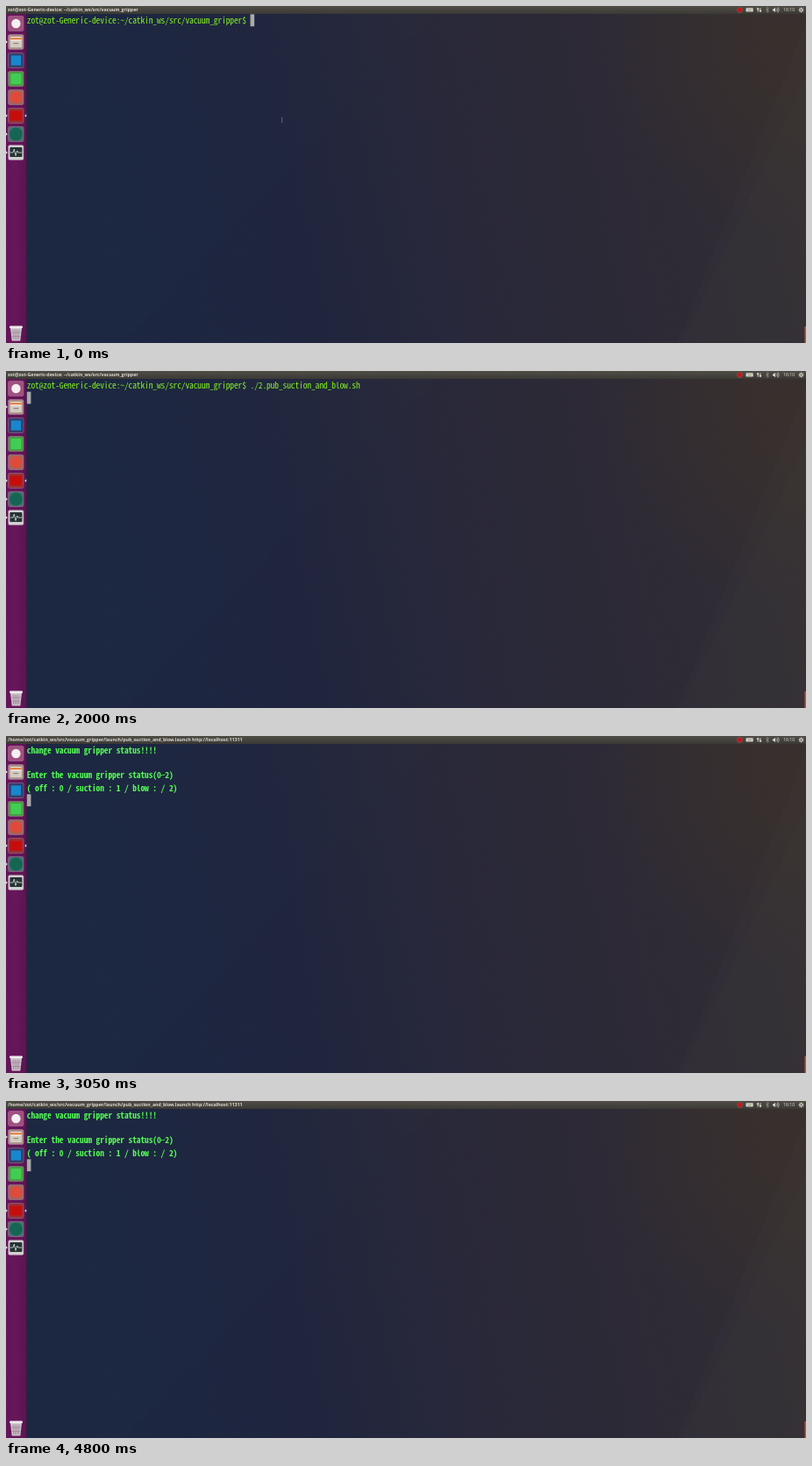
Animation of 912 by 384 pixels, one loop 4.85 s. Source, as an HTML page with a canvas:

```html
<!DOCTYPE html>
<html lang="en">
<head>
<meta charset="utf-8">
<title>Vacuum gripper terminal</title>
<style>
html, body { margin: 0; width: 100%; height: 100%; overflow: hidden; background: #1d2741; }
canvas { display: block; width: 912px; height: 384px; }
</style>
</head>
<body>
<canvas id="stage" width="912" height="384"></canvas>
<script>
const W = 912, H = 384, LOOP = 4850, FRAME = 50;
const COL = 4.631, ROW = 14.23, LEFT = 23.8, BASE = 19.9;
const MONO = '"Noto Sans Mono CJK KR", "Noto Sans Mono CJK JP", "Noto Sans Mono CJK SC", "Noto Sans Mono", monospace';
const GREEN = '#86f622', BRIGHT = '#55ff55', YELLOW = '#ffff00';
const ctx = document.getElementById('stage').getContext('2d');

const prompt = 'zot@zot-Generic-device:~/catkin_ws/src/vacuum_gripper$ ';
const command = './2.pub_suction_and_blow.sh';
const shellTitle = 'zot@zot-Generic-device: ~/catkin_ws/src/vacuum_gripper';
const launchTitle = '/home/zot/catkin_ws/src/vacuum_gripper/launch/pub_suction_and_blow.launch';

// [time, number of command characters on the line]
const typing = [[750, 1], [900, 2], [1150, 3], [1550, command.length]];
const ENTER = 1850, CLEAR = 2900;

// [time, row, text, bold]
const output = [
  [2200, 1, '... logging to /home/zot/.ros/log/d6d5ea46-9eae-11ec-a517-001de0863fef/roslaunch-zot-Generic-device-3853.log'],
  [2200, 2, 'Checking log directory for disk usage. This may take awhile.'],
  [2200, 3, 'Press Ctrl-C to interrupt'],
  [2250, 4, 'Done checking log file disk usage. Usage is <1GB.'],
  [2350, 6, 'started roslaunch server http://localhost:35783/', true],
  [2350, 8, 'SUMMARY'],
  [2350, 9, '========'],
  [2350, 11, 'PARAMETERS'],
  [2350, 12, ' * /rosdistro: kinetic'],
  [2350, 13, ' * /rosversion: 1.12.17'],
  [2350, 15, 'NODES'],
  [2350, 16, '  /'],
  [2350, 17, '    pub_suction_and_blow (vacuum_gripper/pub_suction_and_blow)'],
  [2400, 19, 'auto-starting new master'],
  [2400, 20, 'process[master]: started with pid [3865]', true]
];

function rect(g, x, y, w, h, color) {
  g.fillStyle = color;
  g.fillRect(x, y, w, h);
}

function box(g, x, y, w, h, r, color) {
  g.fillStyle = color;
  g.beginPath();
  g.roundRect(x, y, w, h, r);
  g.fill();
}

function disc(g, x, y, r, color) {
  g.fillStyle = color;
  g.beginPath();
  g.arc(x, y, r, 0, Math.PI * 2);
  g.fill();
}

function poly(g, points, color) {
  g.fillStyle = color;
  g.beginPath();
  points.forEach(([x, y]) => g.lineTo(x, y));
  g.fill();
}

function line(g, points, color, width) {
  g.strokeStyle = color;
  g.lineWidth = width;
  g.beginPath();
  points.forEach(([x, y]) => g.lineTo(x, y));
  g.stroke();
}

function gradient(g, x0, y0, x1, y1, ...colors) {
  const fill = g.createLinearGradient(x0, y0, x1, y1);
  colors.forEach((c, i) => fill.addColorStop(i / (colors.length - 1), c));
  return fill;
}

function wallpaper(g) {
  rect(g, 0, 0, W, H, gradient(g, 40, 280, 890, 90,
    '#1c2842', '#1d2741', '#20263f', '#27293b', '#2c2a37', '#302d35', '#343033'));
  const glow = g.createRadialGradient(890, 40, 10, 890, 40, 220);
  glow.addColorStop(0, 'rgba(62,52,40,.55)');
  glow.addColorStop(1, 'rgba(62,52,40,0)');
  rect(g, 0, 0, W, H, glow);
  poly(g, [[490, 9], [135, H], [770, H], [912, 80], [912, 9]], 'rgba(36,26,52,.06)');
  poly(g, [[912, 20], [765, H], [W, H]], 'rgba(235,245,235,.01)');
  rect(g, 910.5, 365, 1.5, 19, '#d8492c');
}

function tile(g, y, color) {
  box(g, 2.3, y - 8.8, 18, 17.6, 2, 'rgba(255,255,255,.4)');
  box(g, 2.8, y - 8.3, 17, 16.6, 1.6, color);
}

function launcher(g) {
  rect(g, 0, 9, 23.3, H - 9, gradient(g, 0, 0, 23, 0, '#64145a', '#661659', '#5b1452'));
  rect(g, 22.8, 9, 0.6, H - 9, '#45143f');

  tile(g, 20, '#a0517e');
  disc(g, 11.4, 20, 5.2, '#f5eff3');

  tile(g, 41, '#a98f86');
  box(g, 4.8, 35, 13, 12, 1, '#e8e2da');
  rect(g, 4.8, 36.2, 13, 2, '#e67a3c');
  box(g, 4.8, 40, 13, 7.2, 1, '#d3cbc2');
  rect(g, 8.5, 42, 5.6, 1.2, '#8d857d');

  tile(g, 62, '#34406b');
  rect(g, 5.8, 56.4, 11.2, 11.2, '#1787cf');

  tile(g, 83, '#4c9b47');
  rect(g, 5.4, 77, 12, 12, '#41cd52');

  tile(g, 104, '#9a6a62');
  disc(g, 11.4, 104, 7, '#e04a3a');

  tile(g, 125, '#963335');
  rect(g, 4.7, 119.5, 13.4, 11, '#c80c0c');

  tile(g, 146, '#4e6d70');
  disc(g, 11.4, 146, 7.4, '#146653');

  tile(g, 167, '#d0d2d1');
  box(g, 4.4, 161, 14, 11, 1, '#273334');
  line(g, [[5, 167], [8, 167], [9.3, 163], [11, 170.5], [12.7, 165], [14, 167], [18, 167]], '#d7e7e2', 0.8);

  poly(g, [[5, 367], [18, 367], [16.3, 381.5], [6.7, 381.5]], '#cfc7cd');
  box(g, 4, 364.5, 15, 2.8, 1.2, '#eeeaed');
  for (let x = 8; x < 16; x += 2.3) line(g, [[x, 368.5], [x + (11.5 - x) * .15, 380]], '#8b6c85', 0.7);
  line(g, [[6, 372], [17, 372]], '#9a7b94', 0.6);
  line(g, [[6.4, 376.5], [16.6, 376.5]], '#9a7b94', 0.6);

  [41, 125, 146, 167].forEach(y => poly(g, [[0, y - 1.8], [1.8, y], [0, y + 1.8]], '#e5dfe4'));
  poly(g, [[23.2, 123.2], [21.2, 125], [23.2, 126.8]], '#e5dfe4');
}

function panel(g) {
  const ink = '#dfdbd2';
  rect(g, 0, 0, W, 9, gradient(g, 0, 0, 0, 9, '#504e47', '#45433d', '#3c3a36'));
  disc(g, 836.5, 4.5, 3.1, '#8d6a66');
  disc(g, 836.5, 4.5, 2.7, '#c4161b');
  box(g, 843.5, 2.3, 8.2, 4.2, 0.7, ink);
  line(g, [[844.5, 3.7], [850.7, 3.7]], '#777269', 0.5);
  line(g, [[845.5, 5.3], [849.7, 5.3]], '#777269', 0.6);
  poly(g, [[855.6, 4], [857.2, 1.6], [858.8, 4]], ink);
  rect(g, 856.7, 3, 1, 3.5, ink);
  poly(g, [[858.4, 5], [860, 7.4], [861.6, 5]], ink);
  rect(g, 859.5, 2.4, 1, 3.5, ink);
  line(g, [[866.5, 2.9], [869.5, 5.9], [868, 7.4], [868, 1.4], [869.5, 2.9], [866.5, 5.9]], '#a7a39b', 0.6);
  poly(g, [[874, 3.5], [875.3, 3.5], [877, 1.8], [877, 7.2], [875.3, 5.5], [874, 5.5]], ink);
  g.strokeStyle = ink;
  g.lineWidth = 0.6;
  [1.8, 3.2, 4.6].forEach(r => {
    g.beginPath();
    g.arc(876.6, 4.5, r, -0.75, 0.75);
    g.stroke();
  });
  label(g, '16:10', 886, 6.3, '5.2px "Open Sans", "Noto Sans", sans-serif', ink);
  for (let i = 0; i < 8; i++) {
    const a = i * Math.PI / 4;
    line(g, [[906.5, 4.5], [906.5 + 2.9 * Math.cos(a), 4.5 + 2.9 * Math.sin(a)]], ink, 1);
  }
  disc(g, 906.5, 4.5, 2.1, ink);
  disc(g, 906.5, 4.5, 1, '#45433d');
}

// Small type is laid out large and scaled down, which keeps fractional advances.
function label(g, text, x, y, font, color) {
  const zoom = 8;
  g.save();
  g.translate(x, y);
  g.scale(1 / zoom, 1 / zoom);
  g.font = font.replace(/([\d.]+)px/, (_, size) => size * zoom + 'px');
  g.fillStyle = color;
  g.fillText(text, 0, 0);
  g.restore();
}

function print(row, text, color = GREEN, bold = false) {
  const font = `${bold ? 'bold ' : ''}9.5px ${MONO}`;
  [...text].forEach((c, i) => {
    if (c !== ' ') label(ctx, c, LEFT + i * COL, BASE + row * ROW, font, color);
  });
}

function cursor(row, col) {
  rect(ctx, LEFT + col * COL, 9.4 + row * ROW, COL, 13.8, '#aaa9ab');
}

function pointer() {
  line(ctx, [[314.5, 127.5], [314.5, 132.3]], '#858b94', 0.6);
  line(ctx, [[313.7, 127.4], [315.3, 127.4]], '#767c88', 0.5);
  line(ctx, [[313.7, 132.4], [315.3, 132.4]], '#767c88', 0.5);
}

function session(t) {
  const typed = typing.reduce((n, [at, count]) => t >= at ? count : n, 0);
  const line0 = prompt + command.slice(0, typed);
  print(0, line0);
  if (t < ENTER) cursor(0, line0.length);
  else if (t < 2200) cursor(1, 0);
  if (t < typing[0][0]) pointer();
  output.forEach(([at, row, text, bold]) => {
    if (t >= at) print(row, text, bold ? YELLOW : GREEN, bold);
  });
}

function menu() {
  print(0, 'change vacuum gripper status!!!!', BRIGHT, true);
  print(2, 'Enter the vacuum gripper status(0~2)', BRIGHT, true);
  print(3, '( off : 0 / suction : 1 / blow : / 2)', BRIGHT, true);
  cursor(4, 0);
}

function titleAt(t) {
  if (t < 2200) return shellTitle;
  return t < 2600 ? launchTitle : launchTitle + ' http://localhost:11311';
}

const desktop = document.createElement('canvas');
desktop.width = W;
desktop.height = H;
[wallpaper, launcher, panel].forEach(paint => paint(desktop.getContext('2d')));

function draw(now) {
  const t = Math.floor(now % LOOP / FRAME) * FRAME;
  ctx.drawImage(desktop, 0, 0);
  label(ctx, titleAt(t), 2, 6.2, 'bold 5.24px "Open Sans", "Noto Sans", sans-serif', '#dfdbd2');
  if (t < CLEAR) session(t);
  else menu();
}

let start;
function tick(now) {
  start ??= now;
  draw(now - start);
  requestAnimationFrame(tick);
}
draw(0);
requestAnimationFrame(tick);
</script>
</body>
</html>
```
